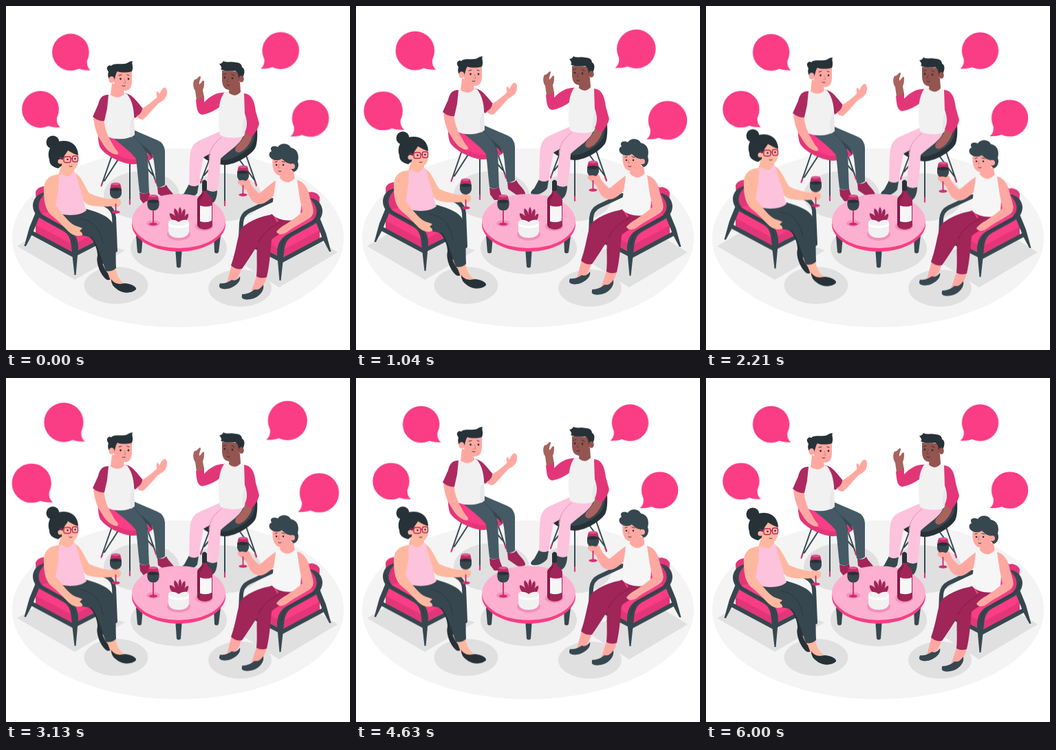
These frames come from a looping animation (500 by 500 pixels, 6.04 s). An HTML page:

```html
<!DOCTYPE html>
<html lang="en">
<head>
<meta charset="utf-8">
<title>Friends around a table</title>
<style>
  html, body { margin: 0; width: 100%; height: 100%; overflow: hidden; background: #fff; }
  svg { display: block; width: 100vw; height: 100vh; }

  .pink { fill: #fa3d85; }
  .rose { fill: #e23679; }
  .blush { fill: #fdc2dc; }
  .wine { fill: #a02558; }
  .wine-dark { fill: #861c49; }
  .sleeve { fill: #ad2a61; }
  .ink { fill: #263238; }
  .slate { fill: #37474f; }
  .steel { fill: #455a64; }
  .white { fill: #f1f1f1; }
  .shade { fill: #e0e0e0; }
  .peach { fill: #ffb8a0; }
  .coral { fill: #ffa8a2; }
  .brown { fill: #a9625d; }
  .brown-dark { fill: #94544f; }
  .line { fill: none; stroke: #37474f; stroke-linecap: round; stroke-linejoin: round; }
  .thin { stroke-width: 2; }
  .tip { fill: none; stroke: #e23679; stroke-width: 2.2; stroke-linecap: round; }
  .mark { fill: none; stroke: #263238; stroke-width: .9; stroke-linecap: round; }
  .fold { fill: none; stroke: #0003; stroke-width: 1; stroke-linecap: round; }

  .bob { animation: bob 6040ms linear infinite; }
  .bob-fast { animation: bob-fast 6040ms linear infinite; }
  .beat { transform-origin: 246px 109px; animation: beat 6040ms linear infinite; }

  @keyframes bob {
    0%, 49.669%, 99.338%, 100% { transform: translateY(0); }
    24.834%, 74.503% { transform: translateY(-10px); }
  }
  @keyframes bob-fast {
    0%, 24.834%, 49.669%, 74.503%, 99.338%, 100% { transform: translateY(0); }
    12.417%, 37.252%, 62.086%, 86.921% { transform: translateY(-10px); }
  }
  @keyframes beat {
    0% { transform: scale(1.005); animation-timing-function: ease-in; }
    9.934%, 47.52% { transform: scale(1.1); }
    27.4% { transform: scale(1); }
    37.58% { transform: scale(1); animation-timing-function: ease-in; }
    62.09%, 100% { transform: scale(1); }
  }
</style>
</head>
<body>
<svg viewBox="0 0 500 500">
  <defs>
    <g id="bubble">
      <circle r="26.700"/>
      <path d="M25 6Q21 20 29 26Q18 27 7 22Z"/>
    </g>

    <!-- Origin at the middle of the rim -->
    <g id="glass">
      <ellipse cy="41" rx="6.2" ry="2.2" fill="#d42f70"/>
      <path d="M0 18V41" stroke="#c92c6a" stroke-width="1.8"/>
      <path d="M-6.5 0C-9 8-9.500 15-6 19C-3 22 3 22 6 19C9.500 15 9 8 6.500 0Z" fill="#c02d68"/>
      <path d="M-8.200 8C-9 14-8 17-6 19C-3 22 3 22 6 19C8 17 9 14 8.200 8Z" class="slate"/>
      <ellipse cy="8" rx="8.200" ry="2.500" class="ink"/>
      <ellipse rx="6.500" ry="1.900" fill="#e0578d"/>
    </g>

    <g id="armchair">
      <path class="rose" d="M43 270Q46 263 55 262L97 277L105 312L73 324L45 306Z"/>
      <path class="pink" d="M58 262Q72 262 104 278L106 314L70 330Z"/>
      <path class="pink" d="M43 303L106 291L152 314V328L98 358L43 331Z"/>
      <path class="rose" d="M43 318L94 345Q98 347 102 345L152 318V330L98 359L43 332Z"/>
      <path class="line" stroke-width="6" d="M38 330L98 362L154 333"/>
      <path class="line" stroke-width="6" d="M112 274L146 290Q156 295 157 307L159 355"/>
      <path class="slate" d="M43 300L49 305L38 332L29 349H26.500L34 322Z"/>
      <path class="slate" d="M57 271C46 272 39 281 39 290C39 300 46 307 54 311L83 327C92 332 94 340 95 350L99.500 391H101.500L105 352C105 339 101 331 92 325L56 305C48 301 45 290 50 281Z"/>
      <path class="fold" d="M43 288C43 298 49 304 56 308L86 324C95 329 98 336 99 346"/>
    </g>
  </defs>

  <rect width="500" height="500" fill="#fff"/>

  <g id="floor">
    <ellipse cx="250" cy="337" rx="241" ry="130" fill="#f4f4f4"/>
    <g class="shade">
      <ellipse cx="197" cy="275" rx="55" ry="35"/>
      <ellipse cx="317" cy="278" rx="55" ry="35"/>
      <ellipse cx="251" cy="352" rx="70" ry="38"/>
      <ellipse cx="160" cy="406" rx="46.500" ry="27"/>
      <ellipse cx="340" cy="410" rx="46" ry="27"/>
      <path d="M16 349L62 322L173 355L100 398Z"/>
      <path d="M482 358L438 331L327 364L397 409Z"/>
    </g>
  </g>

  <g class="pink beat">
    <use href="#bubble" x="94.600" y="67.300"/>
    <use href="#bubble" x="50.900" y="150"/>
    <use href="#bubble" transform="translate(398.500 65) scale(-1 1)"/>
    <use href="#bubble" transform="translate(441.600 163) scale(-1 1)"/>
  </g>

  <!-- Man on the pink chair -->
  <g class="bob">
    <path class="line thin" d="M154 217L139 260M163 223L143 254M180 228V286M206 222L218 256M197 227L214 246"/>
    <path class="tip" d="M140 257L138.500 261.500M180 282V288M216.500 252L218 257"/>
    <path class="rose" d="M135 164C133 180 133 198 137 206C144 217 166 228 182 230C198 230 215 224 215 217V205L180 188L144 190Z"/>
    <path class="pink" d="M137 164C137 180 137 193 142 201C149 211 168 222 184 223C198 223 215 217 214 208L180 184L145 188Z"/>

    <path class="wine" d="M220 262Q227 266 233 260C236 267 244 272 246 279C247 283 238 284 234 282L221 273Z"/>
    <path class="wine" d="M194 271Q201 275 208 270C209 277 214 284 213 289H201L195 281Z"/>
    <path class="steel" d="M185 180L220 195Q230 199 231 211V260Q225 265 219 262C217 245 216 228 213 216L180 205Z"/>
    <path class="slate" d="M184 189L207 209Q212 214 213 222L208 216Z"/>
    <path class="steel" d="M153 189C165 200 181 211 189 222C191 237 192 254 194 270Q200 275 208 270C207 253 207 235 206 221C205 209 195 199 187 184Z"/>
    <path class="fold" d="M186 189C194 199 204 207 206 221"/>

    <path class="sleeve" d="M173 127C184 128 190 139 199 149C198 155 193 160 187 163L182 152Z"/>
    <path class="coral" d="M198 149C207 144 213 138 219 133C220 130 217 125 220 124Q222 125 223 128C225 123 228 118 231 118.500C235 120 235 128 232 133C229 138 225 139 221 142C214 149 206 160 199 165Q193 165 190 160Q198 156 198 149Z"/>
    <path class="white" d="M149 129Q162 124 176 128C184 138 187 153 186 168L187 187C178 195 156 195 146 189C143 170 142 143 149 129Z"/>
    <path d="M186 160C180 166 178 180 182 191L187 187Z" fill="#e8e8e8"/>
    <path class="coral" d="M154 112L170 117L172 128Q163 137 152 129Z"/>
    <path class="coral" d="M127 163C129 178 132 187 138 196C143 205 150 214 160 216Q165 216 162 211C157 206 155 200 151 194C147 186 143 177 143 166Z"/>
    <path class="sleeve" d="M149 129C139 129 136 135 134 143L126 161Q134 168 143 167L147 149Z"/>

    <path class="coral" d="M156 94L183 94L183 108C183 119 179 123 173 123C164 123 158 117 156 108Z"/>
    <path class="ink" d="M147 92C146 88 150 85 153 87C157 82 169 86 176 83Q180 80 184 80C182 84 186 88 183 95C176 97 167 97 162 95C159 98 159 105 157 108L153 110C149 106 147 101 149 96Z"/>
    <ellipse class="coral" cx="153.500" cy="107" rx="4" ry="4.800"/>
    <g class="ink"><circle cx="166.500" cy="106" r="1.400"/><circle cx="178" cy="106" r="1.400"/></g>
    <path class="mark" d="M164 101L168 100M176 100L179 101M169 116Q171 117 173 116"/>
    <path class="fold" d="M172 106L174 112H171"/>
  </g>

  <!-- Man on the dark chair -->
  <g class="bob">
    <path class="line thin" d="M349 217L364 260M339 223L361 253M318 230V287M296 222L283 256M304 227L288 246"/>
    <path class="tip" d="M362 256L364 261M318 284V290M284.500 252L283 257"/>
    <path class="ink" d="M364 168C366 183 366 199 362 207C354 218 335 230 318 231C302 230 286 223 285 216V207L320 188L355 190Z"/>
    <path class="slate" d="M362 170C363 184 362 195 357 202C349 212 332 223 316 224C302 223 288 217 286 209L320 186L355 190Z"/>

    <path class="slate" d="M266 259Q273 264 280 260L278 272C273 278 266 282 257 281C252 280 254 276 259 272Z"/>
    <path class="slate" d="M292 267Q300 272 307 268C307 277 304 286 298 288H289L292 276Z"/>
    <path class="blush" d="M316 180L280 196Q270 201 268 213C266 230 267 245 266 260Q273 264 280 260C282 246 285 230 287 220L318 202Z"/>
    <path class="blush" d="M345 187C343 200 324 210 312 222C311 240 310 256 307 268Q299 271 292 267C293 249 294 232 296 219C297 206 307 199 314 188Z"/>
    <path class="fold" d="M313 191C303 199 296 207 295 222" style="stroke:#e88db6"/>

    <path class="rose" d="M276 136C277 148 278 157 285 158C295 157 306 150 312 146L320 126C307 125 298 130 288 140V131Z"/>
    <path class="brown" d="M274 107C271 111 272 119 275 123L277 137L288 133L286 122C288 118 288 113 288 109Q286 107 284 111L281 114C280 109 285 103 282 102C279 103 278 107 274 107Z"/>
    <path class="white" d="M317 126Q331 121 346 127C352 141 351 165 350 185C345 194 318 193 311 187C307 165 308 138 317 126Z"/>
    <path d="M348 160C343 168 343 180 344 190L350 185Z" fill="#e8e8e8"/>
    <path class="brown-dark" d="M325 115L340 110L341 125Q333 134 324 126Z"/>
    <path class="brown" d="M348 183L358 190C355 201 347 210 339 213Q331 213 334 205C339 199 345 194 348 183Z"/>
    <path class="rose" d="M346 127C357 128 361 137 363 153L368 171C366 180 361 186 357 191L347 184C352 174 350 165 347 156Z"/>

    <path class="brown-dark" d="M314 94L341 95L339 109C337 118 331 123 324 122C316 121 314 114 314 106Z"/>
    <path class="ink" d="M310 84Q314 84 316 80C322 83 327 80 334 82C341 82 343 86 343 89C348 91 347 99 344 104L341 109L338 106C338 100 337 96 333 94C326 95 317 95 312 92C315 90 312 87 310 84Z"/>
    <ellipse class="brown-dark" cx="342" cy="106" rx="3.800" ry="4.800"/>
    <g class="ink"><circle cx="318" cy="104" r="1.400"/><circle cx="329" cy="105" r="1.400"/></g>
    <path class="mark" d="M316 99.500L320 98.500M328 99L332 101M321 115Q323 116 325 115"/>
    <path class="fold" d="M323 105L321 110H324"/>
  </g>

  <!-- Table -->
  <g>
    <g class="slate">
      <path d="M189 334H199L197 358Q194 361 191 358Z"/>
      <path d="M246 350H256L254 379Q251 382 248 379Z"/>
      <path d="M302 334H312L309 358Q306 361 303 358Z"/>
    </g>
    <path class="pink" d="M183 312V319C185 340 215 357 251 357S317 340 319 319V312Z"/>
    <ellipse cx="251" cy="312.500" rx="68" ry="39.500" fill="#fdb0cf"/>
    <g fill="#f291b8">
      <ellipse cx="251" cy="332" rx="17" ry="9"/>
      <ellipse cx="288" cy="320" rx="13" ry="7"/>
      <ellipse cx="214" cy="316" rx="10" ry="4.500"/>
    </g>
    <use href="#glass" x="214" y="276"/>

    <path class="wine" d="M250 318C240 312 237 305 238 301Q245 302 248 309C243 301 244 296 245 294Q250 297 251 304Q250 295 253 292Q256 297 255 304Q256 296 260 295Q262 302 258 309Q261 302 265 302C266 309 261 315 254 318Z"/>
    <path class="white" d="M236 315C236 310 244 309 251 314C258 309 266 310 266 315V328C265 334 259 337 251 337S237 334 236 328Z"/>
    <path d="M236 315C240 321 262 321 266 315V319C261 324 241 324 236 319Z" fill="#fff"/>

    <path class="wine" d="M285 256H292V270C293 275 300 276 300 283V318C300 327 278 327 278 318V283C278 276 285 275 285 270Z"/>
    <path class="wine-dark" d="M278 283C278 276 285 275 285 270L287 271C287 279 282 278 282 286V322L278 318Z"/>
    <path class="ink" d="M285 255Q288.500 250 292 255V268Q288.500 270 285 268Z"/>
    <path d="M282 290Q291 293 299 290V312Q291 316 282 313Z" fill="#f7f7f7"/>
  </g>

  <!-- Woman with glasses -->
  <g class="bob-fast">
    <use href="#armchair"/>
    <path class="peach" d="M137 366L151 366L152 392L145 392Z"/>
    <path class="ink" d="M133 363C130 373 138 393 147 398Q155 399 154 392C146 390 142 379 139 371Z"/>
    <path class="ink" d="M108 326L134 322L150 376Q140 377 133 369C134 356 130 346 124 338Z"/>
    <path class="peach" d="M145 380L159 378C160 389 163 397 173 404L169 411L153 402Z"/>
    <path class="ink" d="M153 397C159 406 167 404 173 403C183 404 190 408 189 412C183 418 171 418 163 413Q152 406 153 397Z"/>
    <path class="slate" d="M73 299C84 304 104 304 117 295C135 300 150 306 155 316C161 332 159 357 160 381Q153 387 145 385C138 365 134 349 125 336C105 334 82 324 73 299Z"/>
    <path class="fold" d="M108 309C126 312 136 322 141 345"/>

    <path class="peach" d="M100 243C109 246 113 260 121 272C132 277 144 280 153 281C158 276 166 279 167 286Q165 295 154 291C140 292 124 292 116 287C109 281 106 270 102 261Z"/>
    <path class="peach" d="M81 229H99V244Q91 252 75 249Z"/>
    <path class="blush" d="M76 246L81 244Q91 253 98 241L101 242C105 256 107 264 110 272C113 280 113 289 117 297C108 306 81 306 71 298C70 280 73 261 76 246Z"/>
    <path class="peach" d="M77 245C62 245 54 255 55 268C55 284 57 297 67 305C76 312 84 321 91 328C99 335 106 335 111 333Q112 330 107 327L111 323C104 320 98 319 94 315C86 308 79 298 72 290L76 267Z"/>
    <use href="#glass" x="159.500" y="258.500"/>
    <path class="peach" d="M155 281Q162 279 167 283V288Q162 288 157 287Z"/>

    <circle class="ink" cx="68" cy="198" r="9.500"/>
    <path class="peach" d="M78 206L104 209C107 223 105 237 96 239C87 241 80 235 78 226Z"/>
    <path class="ink" d="M63 223C58 207 70 195 85 196C97 197 104 203 105 217C98 215 94 212 90 210C86 217 82 219 81 232L76 236C68 234 63 231 63 223Z"/>
    <circle class="peach" cx="79" cy="226" r="3.600"/>
    <g fill="none" stroke="#c0215f" stroke-width="1.300">
      <rect x="84" y="219" width="10" height="8.500" rx="2.500"/>
      <rect x="96.500" y="218" width="8" height="8.500" rx="2.500"/>
      <path d="M94 222L96.500 221.500M84 222L78 220"/>
    </g>
    <g class="ink"><circle cx="89.500" cy="223" r="1.300"/><circle cx="100.500" cy="222" r="1.300"/></g>
    <path class="mark" d="M92 233Q94 234 96 233"/>
  </g>

  <!-- Woman with short hair -->
  <g class="bob">
    <use href="#armchair" transform="translate(499 8) scale(-1 1)"/>
    <path class="coral" d="M328 376L342 381C341 388 337 396 331 401L321 403Z"/>
    <path class="slate" d="M311 403C318 404 324 401 328 398Q334 401 340 393C342 400 334 407 326 410C317 413 309 411 310 406Z"/>
    <path class="wine" d="M388 303C369 305 346 316 340 326C335 345 333 361 327 377Q334 384 343 382C353 368 362 352 370 343L397 320Z"/>
    <path class="coral" d="M365 390L379 392C378 401 371 413 364 418L355 419Z"/>
    <path class="slate" d="M343 419C350 419 357 416 361 412Q368 414 374 405C376 414 368 422 360 425C350 428 341 427 343 421Z"/>
    <path class="wine" d="M389 303L428 309C426 322 398 328 386 340C384 360 383 377 379 394Q371 397 364 393C366 374 363 358 366 344C370 330 388 321 396 312Z"/>
    <path class="fold" d="M398 315C383 322 371 332 367 344"/>

    <path class="coral" d="M395 252C385 257 376 267 368 272C361 267 356 260 354 254C349 247 338 247 337 255C339 262 346 263 350 269C354 279 358 287 368 288C376 288 382 282 389 276Z"/>
    <use href="#glass" x="344.500" y="233.500"/>
    <path class="coral" d="M337 255Q343 251 350 255L347 260Q341 261 337 258Z"/>
    <path class="coral" d="M400 240H418L420 253Q409 263 397 253Z"/>
    <path d="M392 252L398 250Q408 262 419 251L426 254C430 272 430 291 427 309C415 314 395 312 387 303C386 286 391 270 392 252Z" fill="#f6f6f6"/>
    <path class="coral" d="M423 253C434 255 440 267 442 280C447 295 449 301 443 307C433 314 420 320 412 326C404 333 396 334 393 328Q399 321 407 317C416 311 426 304 431 299L427 280Z"/>

    <path class="coral" d="M388 218C386 231 388 243 396 246C404 248 412 244 415 238L416 219Z"/>
    <path class="slate" d="M388 223C380 219 382 212 386 211C382 204 390 202 395 205C399 198 411 199 414 206C422 207 427 215 424 226C427 233 423 240 418 241Q413 238 413 229C408 229 404 225 401 222Q395 226 388 223Z"/>
    <circle class="coral" cx="416" cy="233" r="4"/>
    <g class="ink"><circle cx="393" cy="231" r="1.300"/><circle cx="403" cy="231" r="1.300"/></g>
    <path class="mark" d="M391 227L394 226M401 226L405 227M396 240Q398 241 400 240"/>
    <path class="fold" d="M397 230L395.500 235H398"/>
  </g>
</svg>
</body>
</html>
```
